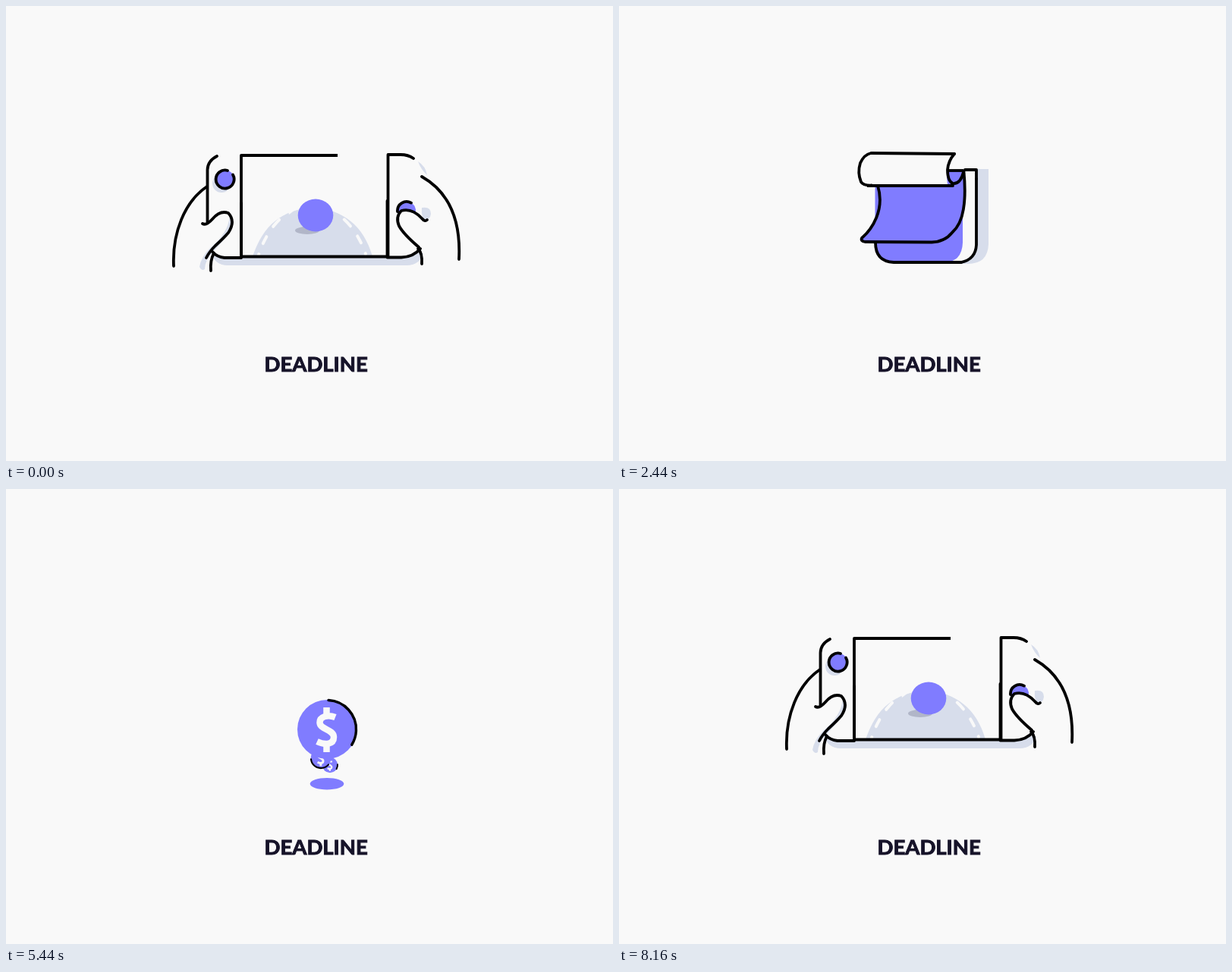
Write an HTML page that moves like this. It is 800 by 600 pixels and loops after 8200 ms.

```html
<!DOCTYPE html>
<html lang="en">
<head>
<meta charset="utf-8">
<title>Deadline</title>
<style>
html, body { margin: 0; width: 100%; height: 100%; overflow: hidden; background: #f9f9f9; }
svg { display: block; width: 800px; height: 600px; }
text { font: 700 27.5px Lato, "Open Sans", sans-serif; fill: #161329; stroke: #161329; stroke-width: 1; text-anchor: middle; }
</style>
</head>
<body>
<svg id="stage" viewBox="0 0 800 600"><text x="408.7" y="482.2">DEADLINE</text></svg>
<script>
const LOOP = 8200, STEP = 40;
const BG = '#f9f9f9', VIOLET = '#807cff', PALE = '#d7ddeb';
const stage = document.getElementById('stage');
const scenes = [];

const clamp = v => Math.max(0, Math.min(1, v));
const ramp = (t, a, b) => { const k = clamp((t - a) / (b - a)); return k * k * (3 - 2 * k); };

// Rows are [time, value, value, ...]
function track(rows, t) {
  const last = rows.length - 1;
  if (t <= rows[0][0]) return rows[0].slice(1);
  if (t >= rows[last][0]) return rows[last].slice(1);
  const i = rows.findIndex(r => r[0] > t);
  const p = rows[i - 1], q = rows[i], k = ramp(t, p[0], q[0]);
  return p.slice(1).map((v, n) => v + (q[n + 1] - v) * k);
}

function node(parent, tag, attrs) {
  const el = document.createElementNS('http://www.w3.org/2000/svg', tag);
  for (const k in attrs) el.setAttribute(k, attrs[k]);
  return parent.appendChild(el);
}

const group = parent => node(parent, 'g', {});
const move = (el, x, y) => el.setAttribute('transform', `translate(${x} ${y})`);
const ell = (x, y, rx, ry) =>
  `M${x - rx} ${y}a${rx} ${ry} 0 1 1 ${2 * rx} 0a${rx} ${ry} 0 1 1 ${-2 * rx} 0`;

function trim(el, tail, head) {
  const len = head - tail;
  el.style.visibility = len > 0.002 ? 'inherit' : 'hidden';
  if (len > 0.998) return el.removeAttribute('stroke-dasharray');
  el.setAttribute('stroke-dasharray', `${Math.max(0, len)} 2`);
  el.setAttribute('stroke-dashoffset', -tail);
}

// A scene lives from start to end and erases itself from leave on.
function scene(start, leave, end, center, grow, weight = 3.8) {
  const g = group(stage), parts = [];
  const self = {
    g, pose: () => {},
    line(parent, d, a, b, c = leave, e = end, width = weight) {
      const el = node(parent, 'path', {
        d, pathLength: 1, fill: 'none', stroke: '#000', 'stroke-width': width,
        'stroke-linecap': 'round', 'stroke-linejoin': 'round'
      });
      parts.push(t => trim(el, ramp(t, c, e), ramp(t, a, b)));
      return el;
    },
    fill(parent, d, color, a = start, c = leave, e = end) {
      const el = node(parent, 'path', { d, fill: color });
      parts.push(t => el.setAttribute('opacity', ramp(t, a, a + 160) * (1 - ramp(t, c, e))));
      return el;
    },
    draw(t) {
      const on = t >= start && t < end;
      g.style.display = on ? '' : 'none';
      if (!on) return;
      const s = 1 + grow * ramp(t, leave, end), [x, y] = center;
      g.setAttribute('transform', `translate(${x} ${y}) scale(${s}) translate(${-x} ${-y})`);
      parts.forEach(p => p(t));
      self.pose(t);
    }
  };
  scenes.push(self);
  return self;
}

function handheld() {
  const s = scene(-420, 880, 1280, [409, 262], 0.15), g = s.g;
  const early = d => s.line(g, d, -400, -20);
  const late = d => s.line(g, d, 0, 360);
  const fill = (d, c, a) => s.fill(g, d, c, a);

  fill('M270 326Q276 342 292 342H528Q545 342 550 326Z', PALE);
  fill('M265 216Q266 196 288 196H525Q550 198 550 220V310Q545 331 521 331H288Q265 330 265 310Z', BG);
  fill('M325 330C340 288 362 270 405 265C445 270 470 288 483 330Z', PALE);
  fill('M371 267L373 275L381 269Z', BG);
  for (const d of ['M333 328C338 312 348 293 362 280', 'M474 327C469 312 459 293 444 280']) {
    const dash = fill(d, 'none');
    dash.setAttribute('stroke', BG);
    dash.setAttribute('stroke-width', 4);
    dash.setAttribute('stroke-linecap', 'round');
    dash.setAttribute('stroke-dasharray', '1 15 10 16 12 99');
  }
  const ball = group(g);
  s.fill(ball, ell(397, 296, 16, 5), '#b1b6c8', -260);
  s.fill(ball, ell(408, 276, 23.3, 21.5), VIOLET, -300);

  fill(ell(284, 234, 12, 12), PALE);
  fill(ell(289, 228, 11.5, 11.5), VIOLET);
  fill(ell(528, 270, 12, 12), VIOLET);
  early('M299 222.5A12 12 0 1 1 292 217');
  late('M292 217Q297 218 299 222.5');
  early('M516 271A12 12 0 0 1 534 259.6');

  early('M278 198Q266 204 265.5 216V285');
  late('M278 198Q283 196 310 196');
  early('M310 331V197H437').setAttribute('stroke-linecap', 'butt');
  late('M437 197H504');
  early('M503.5 331V196H520Q530 196 537 201');
  late('M537 201Q551 208 552 225V282');

  fill('M259 287Q264 290 272 281Q282 269 293 273Q303 284 293 299Q282 311 264 332L250 330Z', BG);
  fill('M295 278Q303 288 293 301Q283 313 274 323Q262 335 262 347Q258 350 255 344Q257 331 270 318Q292 300 295 278Z', PALE);
  fill('M555 282Q552 285 548 280Q535 266 521 270Q513 278 519 290Q527 304 544 318L560 330L575 300Z', BG);
  fill('M548 266Q560 264 560 274Q559 282 552 282Q547 278 548 266Z', PALE);
  fill('M543 205Q553 211 555 223Q547 216 543 205Z', PALE);

  early('M272 324Q278 331 288 332H310V260');
  early('M310 330.5H503');
  early('M502.5 257V331.5H521Q537 331 546 320');
  early('M221 343C219 300 235 258 265 238');
  early('M259 287Q264 290 272 281Q282 269 293 273Q303 284 293 299Q287 306 276 316Q268 324 264 332');
  early('M270 349Q269 335 274 326');
  early('M548 225C578 242 600 275 597 334');
  early('M555 282Q552 285 548 280Q535 266 521 270Q513 278 518 290Q524 301 544 318');
  early('M548 340Q549 326 543 320');
  late('M270 349Q270 360 272 370');
  late('M548 340Q549 355 546 366');

  s.pose = t => {
    const dx = 38 * Math.sin(Math.max(0, t) * Math.PI / 420);
    move(ball, dx, dx * dx * 0.006);
  };
}

function calendar() {
  const s = scene(1300, 2500, 2660, [400, 265], 0.05), g = s.g;
  const early = (p, d) => s.line(p, d, 1330, 1740);
  const late = (p, d) => s.line(p, d, 1760, 2050);

  s.fill(g, 'M455 215H487V314Q486 340 460 340H375Q362 340 358 334H450Z', PALE);
  s.fill(g, 'M440 216H472V312Q470 338 446 338H362Q338 338 338 312V236Z', BG);
  s.fill(g, 'M337.5 236H453V312Q452 338 428 338H362Q338 337 337.5 312Z', VIOLET);
  early(g, 'M471 228V315Q470 334 451 338');
  late(g, 'M451 338H362Q338 337 338 312');
  late(g, 'M471 228V216H456');

  const page = group(g);
  const sheet = 'M341 237Q347 258 338 279Q331 295 318 306Q316 310 322 311L410 311.5Q427 311 437 299Q449 289 453 268Q457 248 455 218';
  s.fill(page, sheet + 'H431V237Z', VIOLET);
  early(page, sheet);
  early(g, 'M454 217H432').setAttribute('stroke-linecap', 'butt');

  s.fill(g, 'M443 195H332Q323 196 318 207Q314 220 319 232Q322 237 335 235.5H433Q429 208 443 195Z', BG);
  early(g, 'M442 195L332 194Q323 196 318 207Q314 220 319 232Q322 237 333 236.5');
  early(g, 'M327 237H424').setAttribute('stroke-linecap', 'butt');
  early(g, 'M442 195Q434 204 433 216Q433 231 440 234Q450 235 454 219');
  late(g, 'M424 237H440');

  s.pose = t => {
    const a = 8 - 8 * Math.cos(Math.max(0, t - 1760) * Math.PI / 380);
    page.setAttribute('transform', `translate(0 237) skewX(${a}) translate(0 -237)`);
  };
}

function robot() {
  const s = scene(2620, 5080, 5400, [407, 310], 0, 3.5);
  const body = group(s.g), desk = group(s.g), head = group(s.g), hand = group(s.g);
  const early = (p, d) => s.line(p, d, 2680, 3020);
  const brief = (p, d) => s.line(p, d, 2680, 3020, 3420, 4160);
  const late = (p, d) => s.line(p, d, 3060, 3360);

  s.fill(body, 'M556 298Q567 312 566 363L575 360Q576 330 570 312Q566 302 556 298Z', PALE);
  s.fill(body, 'M535 277Q553 283 567 300L558 299Q548 290 532 286Z', PALE, 2620, 3080, 3300);
  s.fill(body, 'M470 272L476 267L483 270Z', PALE, 2620, 3080, 3300);
  brief(body, 'M464 295Q456 318 455.5 343');
  late(body, 'M472 277Q462 290 459 312');
  late(body, 'M455.5 330V343');
  brief(body, 'M538 332Q535 350 535.5 373');
  late(body, 'M535.5 373V374');
  brief(body, 'M501 274V281');
  late(body, 'M502 283Q505 290 517 290Q533 290 535 280V270');
  late(body, 'M536 278Q566 288 572 317Q575 333 575 361');
  late(body, 'M535.5 355Q535 318 539 308Q544 298 552 297Q559 296 565 304');

  brief(desk, 'M240 365L213 355L285 337');
  early(desk, 'M338 323L385 311');
  late(desk, 'M410 326L600 390L437 436.5L353 406');
  s.fill(desk, 'M360 330L376 324L418 337L388 345Z', BG);
  early(desk, 'M362 328L376 324L418 336.5L388 344');
  s.fill(desk, 'M312 376V383L433 427L521 403V395Z', PALE);
  s.fill(desk, 'M314 374L398 354L521 396L433 417Z', BG);
  s.fill(desk, 'M402 374L424 367L477 386L448 392Z', PALE);
  s.fill(desk, 'M406 386L463 402L434 411Z', PALE);
  s.fill(desk, 'M254 296L378 337L433 419L314 376Z', VIOLET);
  early(desk, 'M272 320L314 375L384 400.5');
  s.line(desk, 'M384 400.5L396 405', 2700, 3020, 4320, 4520);
  s.line(desk, 'M384 400.5L396 405', 4600, 4760);
  early(desk, 'M396 405L433 418L474 407');
  early(desk, 'M383 344L433 417');
  late(desk, 'M272 320L254 296L378 337L383 344');
  late(desk, 'M474 407L521 396L398 354L389 357');

  s.fill(head, 'M444 197C428 230 446 280 500 280C548 278 564 235 553 198Z', BG);
  s.fill(head, 'M540 207Q556 256 514 279C545 272 559 248 558 220Q557 208 553 199Z', PALE);
  s.fill(head, ell(501, 197.5, 51.5, 12.8), PALE);
  early(head, 'M444 194C437 206 437 221 439 233');
  brief(head, 'M439 233Q441 245 447 252');
  late(head, 'M448 255C463 274 485 281 503 280.5C537 277 558 250 558 222Q558 210 553 198');
  s.line(head, 'M498 182Q512 182 524 184.3', 2680, 3020, 3800, 4500);
  s.line(head, 'M502 182Q512 182 524 184.3', 4600, 4760);
  early(head, 'M524 184.3Q551 189 553.5 197');
  late(head, 'M524 184.3A54.5 14.7 0 1 1 502 182');
  const eye = (x, y, rx, ry) => {
    s.fill(head, ell(x + 2, y - 1, rx * 0.68, ry * 0.88), '#000');
    s.fill(head, ell(x - 4, y - 8, 3.6, 3.6), BG);
    s.line(head, `M${x - rx} ${y + 3}A${rx} ${ry} 0 1 1 ${x + 5} ${y + ry * 0.87}`, 3060, 3360, 5080, 5400, 2.8);
    s.line(head, `M${x - 5} ${y + ry * 0.87}Q${x} ${y + ry + 2} ${x + 5} ${y + ry * 0.87}`, 2680, 3020, 5080, 5400, 3);
  };
  eye(464, 239, 10.5, 15.5);
  eye(502.5, 243, 12, 16.5);

  s.fill(hand, 'M366 318L376 300L398 294L420 302L402 328L376 326L392 308Z', BG);
  for (const d of ['M396 270L380 313', 'M374 320L369 333']) {
    const pen = s.line(hand, d, 2680, 3000, 5080, 5400, 6);
    pen.setAttribute('stroke', VIOLET);
    pen.setAttribute('stroke-linecap', 'butt');
  }
  late(hand, 'M384 291L392 268.5L401 272L393 291');
  brief(hand, 'M389 322Q398 325 409 321M366 321L368 326M370 334L374 342L384 331V318M387 310V311');
  late(hand, 'M364 326Q361 303 372 296Q385 290 397 293Q410 294 414 298');
  late(hand, 'M386 308Q400 301 424 303');
  late(hand, 'M355 328Q372 328 380 322L392 318');
  late(hand, 'M366 320Q370 304 386 302');
  late(hand, 'M376 325Q385 323 398 315Q405 309 411 306M404 312Q408 317 404 322M414 313H420');
  brief(s.g, 'M438 352Q430 354 431 362M446 358Q431 355 436 369Q441 374 445 366M466 358Q454 355 444 364M473 370Q460 368 450 380Q443 382 447 372Q455 361 467 363');

  s.pose = t => {
    const [hx, hy, dy, px] = track([
      [2620, 12, -8, 20, 8], [3040, 6, -7.5, 10, 4], [3400, 0, 0, 0, 0],
      [5080, 0, 0, 0, 0], [5400, 6, -7.5, 10, 5]
    ], t);
    const busy = ramp(t, 3400, 3700) * (1 - ramp(t, 5000, 5200));
    move(head, hx + 1.5 * busy * Math.sin((t - 4560) / 260), hy);
    move(desk, dy * 0.1, dy);
    const w = (t - 4560) / 90;
    move(hand, px + 3 * busy * Math.sin(w), busy * Math.sin(w * 2));
  };
}

function coins() {
  const s = scene(5320, 6380, 6520, [423, 388], 0);
  const shade = s.fill(s.g, ell(0, 0, 22.3, 7.7), VIOLET, 5260);

  function coin(turn, drawn, rows) {
    const g = group(s.g);
    node(g, 'circle', { r: 39, fill: VIOLET });
    node(g, 'path', {
      d: 'M11-16C1-20-9.5-17-9.5-9C-9.5 0 9 0 9 10C9 20-2 21-13 16M-.5-29V-18M-.5 18V30',
      fill: 'none', stroke: BG, 'stroke-width': 8.5
    });
    const ring = node(g, 'path', {
      d: ell(0, 0, 38.5, 38.5), pathLength: 1, transform: `rotate(${turn + 90})`,
      fill: 'none', stroke: '#000', 'stroke-linecap': 'round'
    });
    return t => {
      const [x, y, k] = track(rows, t);
      g.style.display = k > 0.01 ? '' : 'none';
      g.setAttribute('transform', `translate(${x} ${y}) scale(${k})`);
      ring.setAttribute('stroke-width', (1.4 + 2 * k) / Math.max(k, 0.1));
      const [head] = track([[5330, 0], [5440, drawn], [5640, 1]], t);
      trim(ring, 0, head);
    };
  }

  const all = [
    coin(85, 0.1, [[5380, 425, 385, 0], [5440, 427, 364, 0.26], [5720, 491, 300, 1],
      [6060, 491, 290, 1], [6360, 480, 430, 0.8], [6470, 470, 440, 0]]),
    coin(130, 0.37, [[5360, 420, 385, 0], [5440, 415, 355, 0.34], [5680, 355, 285, 1],
      [6020, 355, 278, 1], [6330, 365, 430, 0.8], [6440, 375, 440, 0]]),
    coin(3, 0.33, [[5320, 423, 385, 0], [5440, 423, 317, 1], [5640, 423, 215, 1],
      [5900, 423, 250, 1], [6120, 423, 235, 1], [6400, 423, 442, 1], [6500, 423, 442, 0]])
  ];
  s.pose = t => {
    const k = ramp(t, 5320, 5430);
    shade.setAttribute('transform', `translate(423 388.7) scale(${k})`);
    all.forEach(c => c(t));
  };
}

function meal() {
  const s = scene(6460, 7560, 7800, [405, 270], 0.4), g = s.g;
  const face = group(g), bowl = group(g), steam = group(g), spoon = group(g);
  const early = (p, d) => s.line(p, d, 6500, 6900);
  const late = (p, d) => s.line(p, d, 6930, 7140);

  early(face, 'M345 135Q365 120 386 133');
  early(face, 'M420 133Q440 121 460 135');
  s.fill(face, 'M361 218C361 198 375 186 400 186C430 186 443 208 440 236Q425 217 400 212Q378 208 361 220Z', PALE);
  early(face, 'M392 247C368 242 358 226 358 210C359 188 376 176.5 405 176.5C435 176.5 452 190 452 211C452 227 444 237 431 242');
  late(face, 'M392 247Q412 250 431 242');
  early(face, 'M361 220Q372 212 388 211');
  early(face, 'M403 212Q424 217 439 235');
  late(face, 'M388 211H403');

  s.fill(bowl, 'M341 343C341 385 366 404 402 404C440 404 462 382 463 345Z', BG);
  s.fill(bowl, 'M439 350Q438 383 415 402C444 400 461 380 462 348Z', PALE);
  s.fill(bowl, ell(402, 340.5, 59, 11.5), VIOLET);
  early(bowl, 'M386 352A60.5 12.5 0 1 0 343 341L345 343');
  late(bowl, 'M345 343Q355 350 386 352');
  early(bowl, 'M341.5 340C340 384 366 404 402 404C440 404 462 382 462.5 351');

  for (const x of [394, 404.5, 415]) {
    s.line(steam, `M${x} 314Q${x + 1} 322 ${x - 3} 329`, 6560, 6860, 7560, 7800, 4.8).setAttribute('stroke', VIOLET);
  }
  s.line(spoon, 'M392 345L532 285', 6500, 6900, 7560, 7800, 5).setAttribute('stroke', PALE);
  s.line(spoon, 'M380 343H390', 6500, 6900, 7560, 7800, 2);
  early(spoon, 'M390 340.5L532 280');
  early(spoon, 'M460 312L531 282.5');

  s.pose = t => {
    const k = Math.max(0, t - 6920) / 320 * Math.PI;
    const lift = 0.5 - 0.5 * Math.cos(k);
    spoon.setAttribute('transform', `translate(${8 * lift} ${-50 * lift}) rotate(${-6 * lift} 532 280)`);
    move(face, 0, -5 * lift);
    move(steam, 2 * Math.sin(k * 2), -3 * lift);
  };
}

handheld();
calendar();
robot();
coins();
meal();

function frame(now) {
  const t = Math.floor((now % LOOP) / STEP) * STEP;
  // The handheld enters before the loop wraps.
  scenes.forEach((s, i) => s.draw(i === 0 && t > LOOP / 2 ? t - (LOOP - STEP) : t));
  requestAnimationFrame(frame);
}
frame(0);
</script>
</body>
</html>
```
